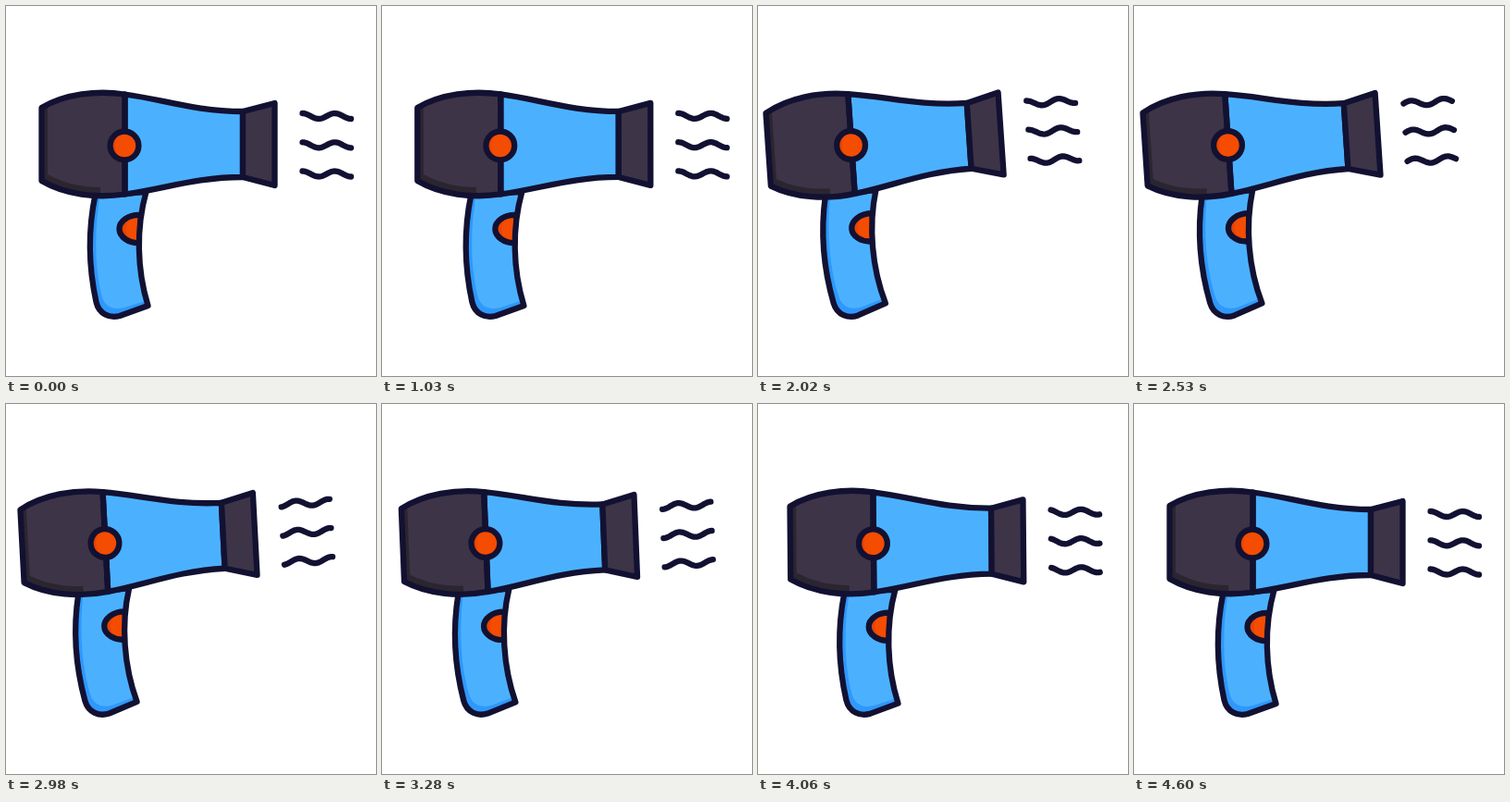
These frames come from a looping animation (400 by 400 pixels, 4.63 s). An HTML page:

```html
<!DOCTYPE html>
<html lang="en">
<head>
<meta charset="utf-8">
<title>Hair dryer</title>
<style>
  html, body { margin: 0; width: 100%; height: 100%; overflow: hidden; background: #fff; }
  svg { display: block; width: 100vw; height: 100vh; }
  .line { stroke: #121132; stroke-width: 6.3; stroke-linecap: round; stroke-linejoin: round; }
  .dark { fill: #3d3447; }
  .shade { fill: #2b2530; }
  .blue { fill: #4bb1ff; }
  .deep { fill: #2f98fc; }
  .orange { fill: #f44c00; }
  .rust { fill: #e64404; }
  .none { fill: none; }
</style>
</head>
<body>
<svg viewBox="0 0 400 400">
  <defs>
    <path id="handle" d="M96.500 204C88 245 89 281 97.500 320C100.500 333 112 338 123 335L153.500 324C141.500 285 140.500 240 151.500 201Z"/>
    <path id="switch" d="M146 226C132 225 122.500 233 122.500 241C122.500 249 132 257 145 256Z"/>
    <path id="rear" d="M38.500 110C64 95 98 91 128.500 95.500V203.500C98 208 64 204 38.500 189Z"/>
    <clipPath id="inHandle"><use href="#handle"/></clipPath>
  </defs>
  <g id="dryer">
    <use href="#handle" class="deep"/>
    <path class="blue" clip-path="url(#inHandle)" d="M102.500 200C94.500 245 96.500 285 103.500 313C106.500 326 117 329 128 326L156 317V200Z"/>
    <g clip-path="url(#inHandle)">
      <use href="#switch" class="orange"/>
      <path class="rust" d="M136 227C120 231 120 252 136 255C127 248 127 234 136 227Z"/>
      <use href="#switch" class="line none"/>
    </g>
    <use href="#handle" class="line none"/>

    <use href="#rear" class="dark"/>
    <path class="shade" d="M39 110L45 107V182C62 191 80 196 102 196V206C75 206 55 199 39 189Z"/>
    <path class="line blue" d="M128.500 95.500C170 101 205 114 256 114V185C205 185 170 198 128.500 203.500Z"/>
    <use href="#rear" class="line none"/>
    <path class="line dark" d="M256 114L290.500 105V194L256 185Z"/>
    <circle class="orange" cx="128" cy="151" r="15.400"/>
    <path class="rust" d="M125 136C109 140 109 162 125 166C116 160 116 142 125 136Z"/>
    <circle class="line none" cx="128" cy="151" r="15.400"/>
    <path id="air" class="line none"/>
  </g>
</svg>
<script>
const LOOP = 4630, HOLD = 1000, STEP = 30, BEAT = 1200;
const dryer = document.getElementById('dryer');
const air = document.getElementById('air');
const clamp = v => Math.min(1, Math.max(0, v));

// Ease with horizontal tangents; x1 and x2 are the handle times.
function ease(u, x1, x2) {
  let lo = 0, hi = 1;
  for (let i = 0; i < 24; i++) {
    const s = (lo + hi) / 2, r = 1 - s;
    if (3 * r * r * s * x1 + 3 * r * s * s * x2 + s ** 3 < u) lo = s; else hi = s;
  }
  return lo * lo * (3 - 2 * lo);
}
const swift = u => ease(clamp(u), .167, .36);
const gentle = u => ease(clamp(u), 1 / 3, 2 / 3);
const puff = u => ease(clamp(u), .25, .2);

function wave(y, shift) {
  let d = '';
  for (let x = 0; x <= 52.5; x += 1.5) {
    const dy = -3 * Math.cos(2 * Math.PI * (x / 35 - shift));
    d += `${d ? 'L' : 'M'}${320.5 + x} ${(y + dy).toFixed(2)}`;
  }
  return d;
}

function draw(now) {
  const t = Math.max(0, Math.floor((now % LOOP - HOLD) / STEP) * STEP);
  const beat = t / BEAT;
  const swing = swift(beat) - gentle((beat - 1) / 2);
  const shift = puff(beat) + puff(beat - 1) / 2 + puff(beat - 2) / 2;
  dryer.setAttribute('transform', `rotate(${-4 * swing} 108 551)`);
  air.setAttribute('d', [119, 150.3, 181.5].map(y => wave(y, shift)).join(''));
}

const start = performance.now();
function tick() {
  draw(performance.now() - start);
  requestAnimationFrame(tick);
}
tick();
</script>
</body>
</html>
```
